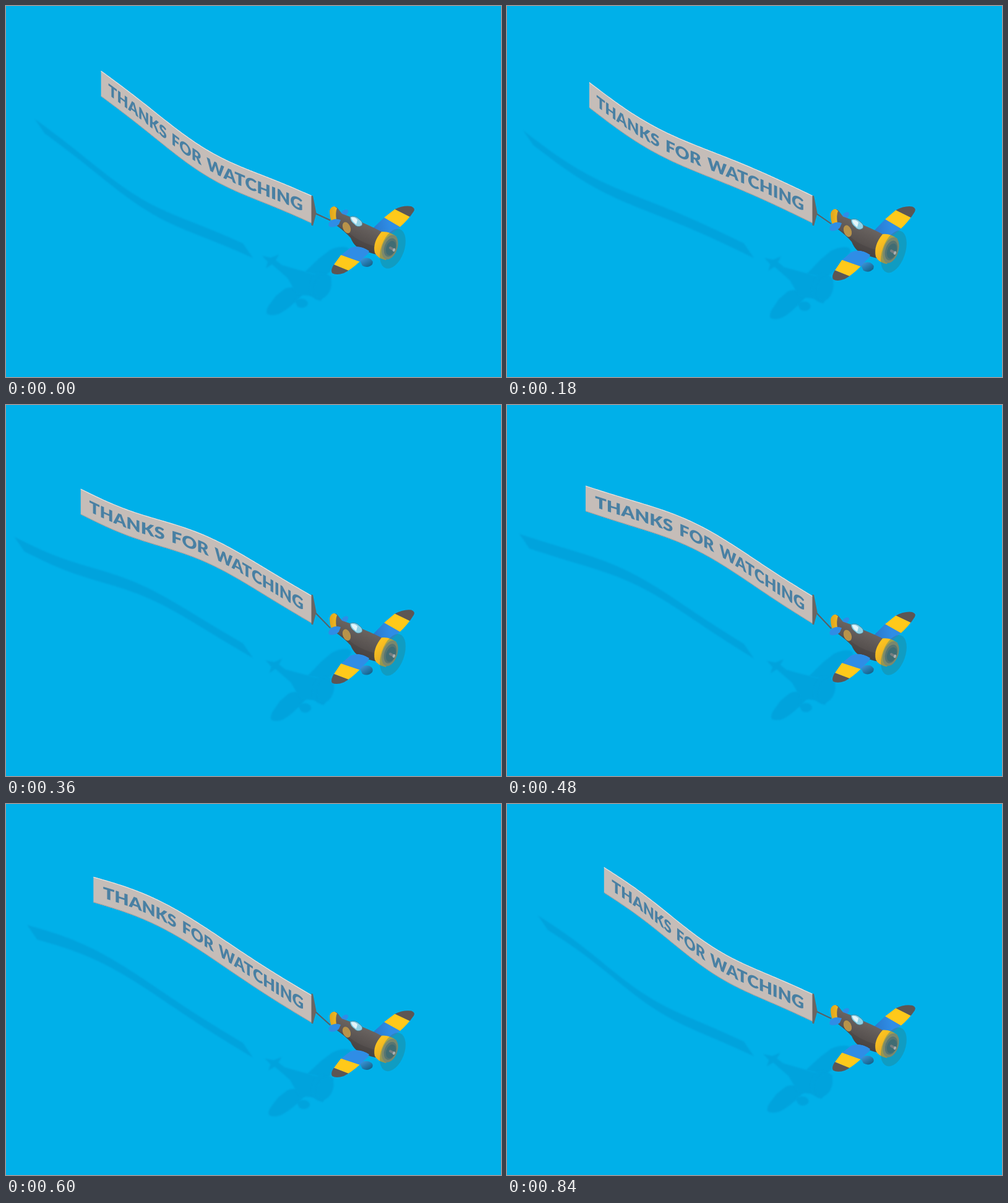
Write an HTML page with a canvas that moves like this. It is 800x600 px and loops after 0.9 s.

```html
<!DOCTYPE html>
<html lang="en">
<head>
<meta charset="utf-8">
<title>Banner plane</title>
<style>
  html, body { margin: 0; width: 100%; height: 100%; overflow: hidden; background: #00b0e9; }
  canvas { display: block; width: 800px; height: 600px; }
</style>
</head>
<body>
<canvas id="stage" width="800" height="600"></canvas>
<script>
const ctx = document.getElementById('stage').getContext('2d');
const LOOP = 900, STEP = 60;
const SKY = '#00b0e9', SHADE = '#00a3dd';
const DARK = '#5c5654', YELLOW = '#ffc91a', BLUE = '#2f8de6';
const TEXT = 'THANKS FOR WATCHING';
const FONT = '900 27px Lato, Inter, sans-serif';
const CAP = 19.4;       // cap height of the lettering
const DEPTH = 0.75;     // foreshortening of the ground plane
const SPAN = 0.925;     // share of the banner taken by the text
const N = 120;

const wave = (t, peak) => Math.cos((t - peak) / LOOP * 2 * Math.PI);
const lerp = (a, b, u) => a + (b - a) * u;

// ---- Banner ----

// Top edge sampled left to right, with running length along the cloth
function bannerCurve(t) {
  const x0 = 139 + 18.3 * wave(t, 807), y0 = 118.7 - 16.8 * wave(t, 817);
  const y1 = 307.8 + 1.4 * wave(t, 540);
  const bends = [0.5 + 24 * wave(t, 42), 7 * wave(t, 232), 3 * wave(t, 370)];
  const pts = [];
  let len = 0;
  for (let i = 0; i <= N; i++) {
    const u = i / N;
    const x = lerp(x0, 494, u);
    const y = bends.reduce((sum, b, k) => sum + b * Math.sin((k + 1) * Math.PI * u), lerp(y0, y1, u));
    const prev = pts[i - 1];
    if (prev) len += Math.hypot(x - prev.x, (y - prev.y) / DEPTH);
    pts.push({ u, x, y, len, h: lerp(41.5, 44.8, u) });
  }
  return pts;
}

function strip(top, bottom) {
  ctx.beginPath();
  top.forEach(p => ctx.lineTo(p[0], p[1]));
  bottom.reverse().forEach(p => ctx.lineTo(p[0], p[1]));
  ctx.closePath();
}

function edge(pts, color, width, offset) {
  ctx.beginPath();
  pts.forEach(p => ctx.lineTo(p.x, p.y + offset(p)));
  ctx.strokeStyle = color;
  ctx.lineWidth = width;
  ctx.stroke();
}

function bannerShadow(pts) {
  const low = pts.map(p => [p.x + lerp(-91, -95, p.u), p.y + p.h + lerp(60, 56, p.u)]);
  const high = low.map(([x, y]) => [x - 16, y - 23.5]);
  strip(high, low);
  ctx.fillStyle = SHADE;
  ctx.fill();
}

function banner(pts) {
  strip(pts.map(p => [p.x, p.y]), pts.map(p => [p.x, p.y + p.h]));
  ctx.fillStyle = '#c5bdb8';
  ctx.fill();
  edge(pts, '#a39d9a', 1, p => p.h - 0.5);
  edge(pts, '#e6e3e1', 1.2, () => 0.5);
  lettering(pts);
}

function lettering(pts) {
  const total = pts[N].len;
  ctx.font = FONT;
  ctx.wordSpacing = '3px';
  ctx.textAlign = 'center';
  ctx.fillStyle = '#4980a3';
  const scale = total * SPAN / ctx.measureText(TEXT).width;
  const start = total * (1 - SPAN) / 2;
  let k = 1;
  [...TEXT].forEach((ch, i) => {
    const mid = ctx.measureText(TEXT.slice(0, i + 1)).width - ctx.measureText(ch).width / 2;
    const s = start + mid * scale;
    while (k < N && pts[k].len < s) k++;
    const a = pts[k - 1], b = pts[k];
    const ds = b.len - a.len, f = (s - a.len) / ds;
    const h = lerp(a.h, b.h, f);
    ctx.save();
    ctx.transform((b.x - a.x) / ds * scale, (b.y - a.y) / ds * scale, 0, h / 44.8,
      lerp(a.x, b.x, f), lerp(a.y, b.y, f) + h / 2);
    ctx.fillText(ch, 0, CAP / 2);
    ctx.restore();
  });
}

// ---- Plane ----

const shapes = {
  rightWing: 'M588 364 L611 342 L628 329 Q642 322 655 324 Q662 327 659 332 Q650 346 636 358 L620 371 Z',
  rightBand: 'M611 342 L628 328 L653 341 L638 358 Z',
  rightTip: 'M628 328.5 L640 318 L668 320 L664 345 L653 341 Z',
  leftWing: 'M556 391 Q571 385 587 396 L586 400 Q580 405 571 414 Q558 426 546 432 Q534 436 527 432 Q524 427 530 418 L541 403 Z',
  leftBand: 'M541 402.5 L530 418 L555 429 L573 414 Z',
  leftTip: 'M529 418 L518 430 L530 440 L556 436 L554 428 Z',
  body: 'M527 327 Q532 322 536 327 L543 336 Q556 340 568 347 Q586 354 607 365 L600 402 Q588 400 578 394 Q564 392 557 375 Q547 364 533 354 L526 346 Z',
  bodyLow: 'M533 354 Q548 361 562 373 Q578 384 598 389 L600 402 Q588 400 578 394 Q564 392 557 375 Q547 364 533 354 Z',
  rudder: 'M523 331 Q525 324 531 324 L535 327 Q532 334 534 346 L526 347 Q523 342 523 331 Z',
  rightTail: 'M541 337 Q543 330 550 329 Q555 330 552 335 Q549 341 543 341 Z',
  leftTail: 'M541 346 Q531 342 524 348 Q519 354 523 357 Q532 359 538 353 Z',
  canopy: 'M556 341 Q564 338 571 345 Q578 350 575 355 Q568 359 563 353 Q556 348 556 341 Z',
  glass: 'M558 342 Q564 341 568 346 L566 353 Q559 348 558 342 Z',
  gear: 'M571 410 Q578 406 587 408 Q595 412 592 418 Q585 425 576 420 Z',
  cowl: 'M607 365 Q620 364 631 373 L614 411 Q600 408 596 399 Q592 382 607 365 Z',
  bodyShadow: 'M519 338 L533 341 L546 336 L541 345 L551 353 L575 360 L612 370 L605 404 L575 400 L560 374 L542 358 L535 352 L525 358 L528 348 Z'
};
for (const name in shapes) shapes[name] = new Path2D(shapes[name]);

function paint(shape, color) {
  ctx.fillStyle = color;
  ctx.fill(shape);
}

function oval(x, y, rx, ry, turn, color) {
  ctx.beginPath();
  ctx.ellipse(x, y, rx, ry, turn, 0, 7);
  ctx.fillStyle = color;
  ctx.fill();
}

function fade(x0, y0, x1, y1, ...colors) {
  const g = ctx.createLinearGradient(x0, y0, x1, y1);
  colors.forEach((c, i) => g.addColorStop(i / (colors.length - 1), c));
  return g;
}

// Vertical shift at (x, y) is q*x + r*y + m: pitch and roll of the plane
function tilt(t) {
  const shift = (amp, peak) => amp * (wave(t, peak) - wave(0, peak));
  const nose = shift(7, 402), tail = shift(8, 430);
  const left = shift(9, 378), right = shift(6, 520);
  const body = [95, 63], wing = [112, -98];
  const pitch = nose - tail, roll = right - left;
  const det = body[0] * wing[1] - body[1] * wing[0];
  const q = (pitch * wing[1] - body[1] * roll) / det;
  const r = (body[0] * roll - wing[0] * pitch) / det;
  return { q, r, m: (left + right) / 2 - q * 594 - r * 381 };
}

function planeShadow({ q, r, m }) {
  const kx = 0.4, ky = 0.65;
  ctx.save();
  ctx.transform(1 + kx * q, ky * q, kx * r, 1 + ky * r, -105 + kx * m, 66 + ky * m);
  for (const name of ['rightWing', 'leftWing', 'bodyShadow', 'gear', 'cowl'])
    paint(shapes[name], SHADE);
  oval(617, 388, 13, 20, 0.35, SHADE);
  ctx.restore();
}

function striped(wing, base, band, tip) {
  ctx.save();
  ctx.clip(wing);
  paint(wing, base);
  paint(band, YELLOW);
  paint(tip, DARK);
  ctx.restore();
}

function plane({ q, r, m }) {
  const s = shapes;
  ctx.save();
  ctx.transform(1, q, 0, 1 + r, 0, m);
  striped(s.rightWing, fade(592, 362, 622, 358, '#2878cc', BLUE), s.rightBand, s.rightTip);
  paint(s.rightTail, BLUE);
  paint(s.gear, fade(576, 408, 584, 422, '#3a93d6', '#17668f'));
  paint(s.body, fade(582, 352, 566, 388, '#6a6461', DARK, '#4d4847'));
  paint(s.bodyLow, 'rgba(50,45,45,.2)');
  paint(s.rudder, fade(523, 335, 535, 335, '#dfa41b', '#f2b922'));
  paint(s.leftTail, BLUE);
  oval(550.5, 358.5, 6, 9.5, -0.4, '#b8934a');
  paint(s.canopy, '#8fd2e6');
  paint(s.glass, '#e4f5f9');
  ctx.strokeStyle = '#4a7f92';
  ctx.lineWidth = 0.8;
  ctx.stroke(s.canopy);
  striped(s.leftWing, BLUE, s.leftBand, s.leftTip);
  paint(s.cowl, fade(598, 378, 618, 402, '#fcc21f', '#e0a428'));
  oval(620.5, 390, 12, 20.5, 0.33, '#b08f5c');
  oval(621, 390.5, 9.5, 15.5, 0.33, '#766f62');
  oval(622, 391.5, 7.5, 12, 0.33, '#4f6166');
  oval(625, 392.5, 18.5, 33.5, 0.35, 'rgba(40,125,135,.4)');
  ctx.lineCap = 'round';
  ctx.strokeStyle = '#777e80';
  ctx.lineWidth = 4;
  ctx.beginPath();
  ctx.moveTo(621, 391);
  ctx.lineTo(626, 394);
  ctx.stroke();
  oval(627, 394.5, 2, 2.8, 0.33, '#a9aeb0');
  ctx.restore();
}

function towBar({ q, r, m }) {
  const x = 524, y = 346.5;
  ctx.lineCap = 'butt';
  ctx.strokeStyle = '#5c5d62';
  ctx.lineWidth = 2;
  ctx.beginPath();
  ctx.moveTo(499, 335);
  ctx.lineTo(x, y + q * x + r * y + m);
  ctx.stroke();
  paint(new Path2D('M493.5 306.5 L496 307 L501.5 335 L496 355.5 L493.5 354.5 Z'), '#6a6562');
}

function draw(now) {
  const t = Math.floor(now % LOOP / STEP) * STEP;
  const pts = bannerCurve(t), pose = tilt(t);
  ctx.fillStyle = SKY;
  ctx.fillRect(0, 0, 800, 600);
  ctx.filter = 'blur(0.8px)';
  bannerShadow(pts);
  planeShadow(pose);
  ctx.filter = 'none';
  banner(pts);
  towBar(pose);
  plane(pose);
}

let begin;
function tick(now) {
  begin ??= now;
  draw(Math.max(0, now - begin));
  requestAnimationFrame(tick);
}
draw(0);
requestAnimationFrame(tick);
</script>
</body>
</html>
```
